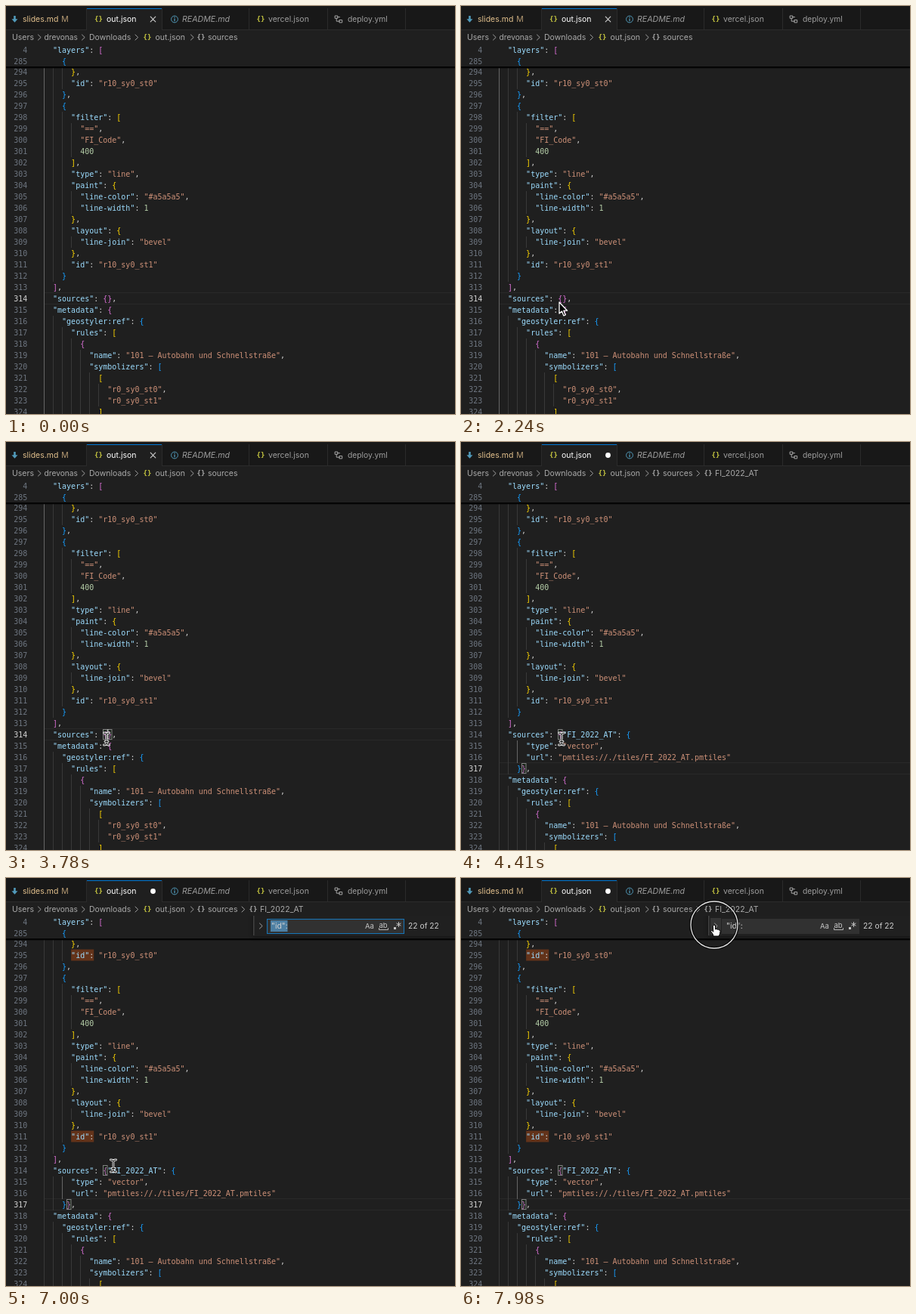
Recreate the animation shown at these times as an HTML page with a canvas. Size 594 px wide and 540 px high, loop 8 s.

```html
<!DOCTYPE html>
<html lang="en">
<head>
<meta charset="utf-8">
<title>Editing a style file</title>
<style>
html, body { margin: 0; width: 100%; height: 100%; overflow: hidden; background: #1f1f1f; }
canvas { display: block; }
</style>
</head>
<body>
<canvas width="594" height="540"></canvas>
<script>
const g = document.querySelector('canvas').getContext('2d');
const MONO = '"DejaVu Sans Mono", monospace', SANS = 'Inter, sans-serif';
const LOOP = 8000, STEP = 70, CHAR = 6.02, LEFT = 50, ROW = 15, FIRST = 294;
const FOCUS = 2660, PASTE = 3850, CRUMB = 4200, FIND = 5600, BLUR = 7910;
const BRACKETS = ['#ffd700', '#da70d6', '#179fff'];

const before = `      },
      "id": "r10_sy0_st0"
    },
    {
      "filter": [
        "==",
        "FI_Code",
        400
      ],
      "type": "line",
      "paint": {
        "line-color": "#a5a5a5",
        "line-width": 1
      },
      "layout": {
        "line-join": "bevel"
      },
      "id": "r10_sy0_st1"
    }
  ],
  "sources": {},
  "metadata": {
    "geostyler:ref": {
      "rules": [
        {
          "name": "101 – Autobahn und Schnellstraße",
          "symbolizers": [
            [
              "r0_sy0_st0",
              "r0_sy0_st1"
            ]`;
const after = before.replace('{},', `{"FI_2022_AT": {
      "type": "vector",
      "url": "pmtiles://./tiles/FI_2022_AT.pmtiles"
    }},`);

const rowY = n => 87 + ROW * (n - FIRST);
const colX = c => LEFT + CHAR * c;
const smooth = u => u * u * (3 - 2 * u);

function rect(x, y, w, h, color) {
  g.fillStyle = color;
  g.fillRect(x, y, w, h);
}
function text(s, x, y, color, font = '10.5px ' + SANS, align = 'left') {
  g.font = font;
  g.textAlign = align;
  g.fillStyle = color;
  g.fillText(s, x, y);
}
function path(d, x, y, stroke, width, fill) {
  const p = new Path2D(d);
  g.save();
  g.translate(x, y);
  g.lineJoin = g.lineCap = 'round';
  if (fill) { g.fillStyle = fill; g.fill(p); }
  if (stroke) { g.strokeStyle = stroke; g.lineWidth = width; g.stroke(p); }
  g.restore();
}
function disc(x, y, r, color) {
  g.beginPath();
  g.arc(x, y, r, 0, 7);
  g.fillStyle = color;
  g.fill();
}
function ring(x, y, r, color, width) {
  g.beginPath();
  g.arc(x, y, r, 0, 7);
  g.strokeStyle = color;
  g.lineWidth = width;
  g.stroke();
}
const braces = (x, y, color) => text('{}', x, y + 3, color, 'bold 9px ' + MONO, 'center');
const chevron = (x, y) => path('M-2 -3.5L1.7 0L-2 3.5', x, y, '#a0a0a0', 1);

// Draws one JSON line and returns the bracket depth after it
function code(line, y, depth) {
  for (const m of line.matchAll(/"[^"]*"|[\[\]{}]|\d+|[,:]/g)) {
    const s = m[0];
    let color = '#cccccc';
    if (s[0] === '"') color = line[m.index + s.length] === ':' ? '#9cdcfe' : '#ce9178';
    else if (/[\[{]/.test(s)) color = BRACKETS[depth++ % 3];
    else if (/[\]}]/.test(s)) color = BRACKETS[--depth % 3];
    else if (/\d/.test(s)) color = '#b5cea8';
    text(s, colX(m.index), y + 3.5, color, '10px ' + MONO);
  }
  return depth;
}
function lineNo(n, y, active) {
  text(n, 28.3, y + 3.5, active ? '#d4d4d4' : '#6e7681', '10px ' + MONO, 'right');
}
function bracketBox(col, n) {
  const x = Math.round(colX(col)) + .5, y = rowY(n) - 7;
  rect(x, y, 6, 14, 'rgba(0,100,0,.1)');
  g.strokeStyle = '#808080';
  g.lineWidth = 1;
  g.strokeRect(x, y + .5, 5.5, 13);
}

function editor(t) {
  const pasted = t >= PASTE, current = pasted ? 317 : 314;
  const y0 = rowY(current) - 8;
  rect(LEFT, y0, 544, 1, '#292929');
  rect(LEFT, y0 + ROW, 544, 1, '#292929');

  let depth = 4;
  (pasted ? after : before).split('\n').forEach((line, i) => {
    const n = FIRST + i, y = rowY(n);
    if (y > 550) return;
    const indent = line.search(/\S/);
    for (let c = 0; c < indent; c += 2) {
      const active = pasted ? c === 4 && (n === 315 || n === 316) : c === 0;
      rect(Math.round(colX(c)), y - 7, 1, ROW, active ? '#666666' : '#393939');
    }
    if (t >= FIND && line.includes('"id":')) rect(colX(indent), y - 7.5, CHAR * 5, ROW, '#63331a');
    depth = code(line, y, depth);
    lineNo(n, y, n === current);
  });

  if (t >= FOCUS) {
    bracketBox(13, 314);
    if (pasted) bracketBox(5, 317); else bracketBox(14, 314);
    const on = t < 3220 || t >= 3780 && t < 4410 || t >= 4900 && t < 5460;
    if (on) rect(Math.round(colX(pasted ? 6 : 14)), rowY(current) - 7, 1.5, 14, '#aeafad');
  }

  rect(0, 50, 594, 31, '#1f1f1f');
  lineNo(4, 58, false);
  code('  "layers": [', 58, 1);
  lineNo(285, 73, false);
  code('    {', 73, 2);
  rect(0, 80, 594, 2, '#050505');
  rect(0, 82, 594, 1, 'rgba(0,0,0,.3)');
}

function findWidget(t) {
  if (t < FIND) return;
  const focused = t < BLUR;
  g.save();
  g.beginPath();
  g.rect(0, 50, 594, 490);
  g.clip();
  g.translate(0, -36 * (1 - Math.min(1, (t - 5570) / 200)));
  g.shadowColor = 'rgba(0,0,0,.5)';
  g.shadowBlur = 5;
  rect(327, 48, 280, 29, '#202020');
  g.shadowBlur = 0;
  rect(327, 48, 1.5, 28, '#414141');
  if (!focused) rect(330, 53, 14, 22, '#353535');
  chevron(337.5, 63.5);
  rect(345, 54, 182, 20, '#313131');
  if (focused) {
    g.strokeStyle = '#1675b8';
    g.lineWidth = 1;
    g.strokeRect(345.5, 54.5, 181, 19);
    rect(350, 56, 22.5, 15, '#4d7fa3');
  }
  text('"id":', 351, 67, '#d0d0d0');
  text('Aa', 481, 67, '#c5c5c5', '9.5px ' + SANS, 'center');
  text('ab', 499, 66, '#c5c5c5', '9.5px ' + SANS, 'center');
  path('M-6 -2V0H6V-2', 499.5, 68.5, '#c5c5c5', .9);
  rect(513, 65, 3, 3, '#c5c5c5');
  path('M0 -3V3M-2.6 -1.5L2.6 1.5M-2.6 1.5L2.6 -1.5', 519.5, 61.5, '#c5c5c5', 1);
  text('22 of 22', 532, 67.3, '#cccccc', '10.3px ' + SANS);
  g.restore();
}

function tabs(t) {
  rect(0, 0, 594, 32, '#181818');
  rect(0, 31, 594, 1, '#2b2b2b');
  rect(107, 3, 99, 29, '#1f1f1f');
  rect(107, 3, 99, 1, '#0078d4');
  for (const x of [106, 206, 321, 425, 528]) rect(x, 3, 1, 29, '#2b2b2b');

  path('M-1.3 -4.5H1.3V-.3H4L0 4.3L-4 -.3H-1.3Z', 11.5, 17.5, null, 0, '#519aba');
  text('slides.md', 22, 21, '#e2c08d');
  text('M', 78, 21, '#b89c74', '10.5px ' + SANS, 'center');
  braces(122.5, 17, '#cbcb41');
  text('out.json', 133, 21, '#ffffff');
  if (t < PASTE) path('M-3.3 -3.3L3.3 3.3M3.3 -3.3L-3.3 3.3', 194.5, 17.5, '#d0d0d0', 1.1);
  else disc(194.5, 17.5, 3.4, '#ffffff');
  ring(223, 17.5, 4.4, '#519aba', 1);
  rect(222.4, 16.7, 1.3, 3.4, '#519aba');
  rect(222.4, 14.6, 1.3, 1.2, '#519aba');
  text('README.md', 233, 21, '#9d9d9d', 'italic 10.6px ' + SANS);
  braces(337, 17, '#cbcb41');
  text('vercel.json', 347, 21, '#9d9d9d');
  path('M-4.5 -4.5H-1.2V-1.2H-4.5ZM-2.8 -1.2V2.7H1.3M1.3 1H4.7V4.4H1.3ZM-1.2 -2.8H1.5', 440, 17.5, '#a5a5a5', 1);
  text('deploy.yml', 452, 21, '#9d9d9d', '10.3px ' + SANS);
}

function breadcrumbs(t) {
  const grey = '#a9a9a9', y = 45;
  rect(0, 32, 594, 18, '#1f1f1f');
  text('Users', 8, y, grey);
  text('drevonas', 50.5, y, grey, '10.2px ' + SANS);
  text('Downloads', 110, y, grey);
  braces(187, 41, '#cbcb41');
  text('out.json', 197.5, y, grey);
  braces(258, 41, grey);
  text('sources', 267, y, grey);
  [44.5, 102.5, 173, 246.5].forEach(x => chevron(x, 41.5));
  if (t >= CRUMB) {
    chevron(314, 41.5);
    braces(327, 41, grey);
    text('FI_2022_AT', 336, y, grey);
  }
}

// time, x, y of the pointer's hot spot
const route = [
  [1820, 240, 496], [1960, 150, 370], [2030, 103, 298], [2100, 108, 330],
  [2240, 130, 392], [2450, 130, 392], [2520, 132, 394], [2660, 133, 393],
  [6930, 133, 393], [7000, 142, 381], [7770, 335, 62], [8000, 335, 62]
];
const ARROW = 'M0 0V15L3.4 12L5.8 17.8L8.2 16.8L5.8 11.2H10.6Z';
const BEAM = 'M-3.5 -8Q0 -8 0 -6Q0 -8 3.5 -8M0 -6V6M-3.5 8Q0 8 0 6Q0 8 3.5 8M-2 3.5H2';
const HAND = 'M-1.5 1Q0 -1 1.5 1V6Q3 4.5 4 6.2Q5.5 5.2 6.3 7Q8 6.5 8 8.5L7.5 12L6 15H-1L-2 12L-4.5 8.5Q-4.5 7 -3 7.5L-1.5 9Z';

function pointer(t) {
  if (t < route[0][0]) return;
  const i = route.findIndex(p => p[0] > t);
  const [t0, x0, y0] = route[i - 1], [t1, x1, y1] = route[i];
  const u = smooth((t - t0) / (t1 - t0));
  const x = x0 + (x1 - x0) * u, y = y0 + (y1 - y0) * u;
  if (t < FOCUS) path(ARROW, x, y, '#ffffff', 1.3, '#000000');
  else if (t < 7700) {
    path(BEAM, x, y, '#f0f0f0', 2.8);
    path(BEAM, x, y, '#111111', 1);
  } else path(HAND, x, y, '#000000', 1, '#ffffff');

  const r = t >= BLUR ? 31 : t >= FOCUS && t < 2800 ? 24 : 0;
  if (r) {
    ring(x, y, r, 'rgba(0,0,0,.6)', 4);
    ring(x, y, r, '#e4e4e4', 1.3);
  }
}

function draw(now) {
  const t = Math.floor((now % LOOP) / STEP) * STEP;
  rect(0, 0, 594, 540, '#1f1f1f');
  editor(t);
  breadcrumbs(t);
  tabs(t);
  findWidget(t);
  pointer(t);
}
const start = performance.now();
function tick() {
  draw(performance.now() - start);
  requestAnimationFrame(tick);
}
tick();
</script>
</body>
</html>
```
